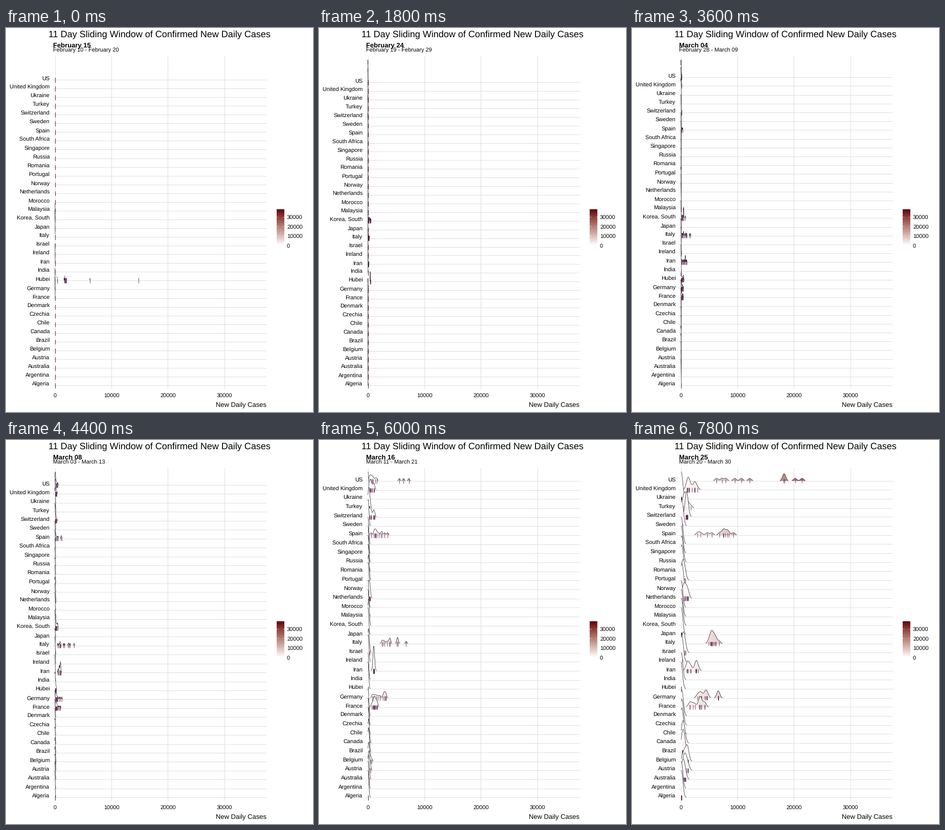
A matplotlib script that plays this animation: 600x750 px, repeating every 8 s.

```python
import numpy as np
import matplotlib.pyplot as plt
from matplotlib.animation import FuncAnimation
from matplotlib.collections import LineCollection, PolyCollection
from matplotlib.colors import LinearSegmentedColormap

W, H, DPI = 600, 750, 100
DAYS, WINDOW, FRAMES = 50, 11, 40
PT = 72 / DPI                      # points per pixel
X0, X_UNIT = 95.6, 0.011037        # pixel of zero, pixels per case
LEFT, RIGHT, TOP, BOTTOM = 91, 509, 55, 703.5
BASE, SPAN = 698.2, 635.8          # lowest baseline, height of all ridges
SCALE, MIN_HEIGHT, ADJUST = 3, 0.01, 1.15
GRID, RUG = "#dedede", "#5a1846"

plt.rcParams["font.family"] = "Liberation Sans"
plt.rcParams["text.hinting"] = "none"

reds = LinearSegmentedColormap.from_list(
    "reds", ["#ffffff", "#dbbeb9", "#b8847b", "#914941", "#67000d"])
days = np.arange(DAYS)             # day 0 is February 10
rng = np.random.default_rng(11)


def curve(*points, noise=0.06):
    """Exponential growth or decay between (day, daily cases) points."""
    x, y = zip(*points)
    level = np.exp(np.interp(days, x, np.log(y)))
    level *= np.exp(np.minimum(days - x[0], 0) / 5)
    return np.round(level * rng.lognormal(0, noise, DAYS))


# Smaller outbreaks share one growth curve, grouped by their final level
GROUPS = {
    1200: "Austria/Belgium/Netherlands/Turkey",
    600: "Australia/Brazil/Canada/Israel/Portugal",
    220: "Chile/Czechia/Denmark/Ireland/Norway/Romania/Russia/Sweden",
    90: "Algeria/Argentina/India/Japan/Malaysia/Morocco/Singapore/"
        "South Africa/Ukraine",
}
cases = {
    name: curve((24, 0.01 * top), (35, 0.15 * top), (46, top), noise=0.2)
    for top, group in GROUPS.items() for name in group.split("/")
}
cases |= {
    "US": curve((23, 30), (32, 516), (37, 1600), (38, 5600), (44, 12000),
                (45, 17900), (49, 20900), noise=0.02),
    "Spain": curve((24, 40), (31, 1000), (40, 3600), (44, 8600), (49, 7500)),
    "Italy": curve((12, 40), (19, 250), (26, 1200), (33, 3300), (39, 5900),
                   (49, 5200), noise=0.1),
    "Germany": curve((24, 150), (32, 1200), (37, 2900), (44, 4400),
                     (45, 6700), (47, 6900), (48, 4500)),
    "France": curve((24, 150), (32, 1000), (40, 1800), (43, 3200),
                    (49, 4200)),
    "United Kingdom": curve((24, 35), (32, 340), (39, 1100), (44, 1500),
                            (46, 2600)),
    "Iran": curve((14, 15), (22, 600), (28, 950), (41, 1150), (46, 2700),
                  (49, 3150)),
    "Korea, South": curve((8, 1), (10, 73), (19, 700), (24, 480), (28, 120),
                          (49, 95), noise=0.2),
    "Switzerland": curve((24, 40), (32, 300), (38, 1050), noise=0.12),
    "Hubei": curve((0, 2000), (8, 1690), (9, 400), (19, 420), (24, 120),
                   (31, 4), (35, 0.1), noise=0.03),
}
cases["Hubei"][2:5] = 0, 14840, 6200    # the backlog reported at once

names = sorted(cases, key=str.lower)
data = np.array([cases[n] for n in names])


def bandwidth(v):
    sd = v.std(ddof=1)
    iqr = np.subtract(*np.percentile(v, [75, 25])) / 1.34
    return 0.9 * (min(sd, iqr) or sd or abs(v[0]) or 1) * len(v) ** -0.2


def densities(win):
    bw = ADJUST * np.mean([bandwidth(v) for v in win])
    x = np.linspace(win.min() - 3 * bw, win.max() + 3 * bw, 512)
    z = (x[None, :, None] - win[:, None, :]) / bw
    d = np.exp(-z * z / 2).mean(axis=2)
    return x, d / d.max()


def date(d):
    return f"February {d + 10:02d}" if d < 20 else f"March {d - 19:02d}"


fig = plt.figure(figsize=(W / DPI, H / DPI), dpi=DPI, facecolor="white")
ax = fig.add_axes([0, 0, 1, 1])
ax.axis("off")


def label(x, y, s, size, ha="left", **kw):
    return ax.text(x, y, s, fontsize=size * PT, ha=ha, va="baseline", **kw)


label(300, 17, "11 Day Sliding Window of Confirmed New Daily Cases", 18,
      "center")
label(RIGHT, 740, "New Daily Cases", 13, "right")
heading = label(92, 38, "", 13, weight="bold")
subtitle = label(92, 47, "", 11)

ax.imshow(np.linspace(0, 1, 140)[:, None], cmap=reds, origin="lower",
          aspect="auto", extent=(529, 544, 424, 354))
for v in range(0, 40000, 10000):
    x, y = X0 + v * X_UNIT, 424.2 - v * 0.00185
    ax.plot([x, x], [TOP, BOTTOM], color=GRID, lw=PT, zorder=1)
    label(x, 721, str(v), 11, "center")
    label(549, y + 4.4, str(v), 11)
    for a in (529, 541):
        ax.plot([a, a + 3], [y, y], color="white", lw=0.5 * PT)

rows = LineCollection([], colors=GRID, linewidths=PT, zorder=1)
ax.add_collection(rows)
row_names = [label(85.5, 0, n, 11, "right") for n in names]
ax.set_xlim(0, W)
ax.set_ylim(H, 0)
ridges = []


def draw_ridge(x, h, values, base, step, z):
    keep = (x >= 0) & (h >= MIN_HEIGHT)
    px = X0 + x * X_UNIT
    py = base - SCALE * step * h
    i = np.flatnonzero(keep[:-1] & keep[1:])
    flat = np.full(len(i), base)
    quads = np.stack([
        np.column_stack([px[i], flat]), np.column_stack([px[i], py[i]]),
        np.column_stack([px[i + 1], py[i + 1]]),
        np.column_stack([px[i + 1], flat])], axis=1)
    fill = PolyCollection(quads, facecolors=reds(x[i] / 37700),
                          edgecolors="face", linewidths=0.2, zorder=z)
    marks = [[(X0 + v * X_UNIT, base - 4), (X0 + v * X_UNIT, base + 4.6)]
             for v in values]
    rug = LineCollection(marks, colors=RUG, linewidths=0.75 * PT,
                         zorder=z + 0.02)
    ax.add_collection(fill, autolim=False)
    ax.add_collection(rug, autolim=False)
    line, = ax.plot(px, np.where(keep, py, np.nan), color="#1c1c1c",
                    lw=0.7 * PT, zorder=z + 0.01, scalex=False, scaley=False)
    ridges.extend([fill, rug, line])


def update(i):
    while ridges:
        ridges.pop().remove()
    win = data[:, i:i + WINDOW]
    x, dens = densities(win)
    order = np.arange(len(names))
    step = SPAN / (order + SCALE * dens.max(axis=1)).max()
    bases = BASE - order * step
    heading.set_text(date(i + 5))
    subtitle.set_text(f"{date(i)} - {date(i + 10)}")
    rows.set_segments([[(LEFT, y), (RIGHT, y)] for y in bases])
    for k, y in enumerate(bases):
        row_names[k].set_y(y + 1)
        draw_ridge(x, dens[k], win[k], y, step, 10 - 0.1 * k)
    return []


# Upper rows are drawn first so that lower ridges overlap them
def draw(i):
    update(i)
    for k in range(len(names)):
        for j, part in enumerate(ridges[3 * k:3 * k + 3]):
            part.set_zorder(10 - 0.1 * k + (0, 0.02, 0.01)[j])
    return []


anim = FuncAnimation(fig, draw, frames=FRAMES, interval=200,
                     init_func=lambda: [], repeat=True, repeat_delay=0)
plt.show()
```
